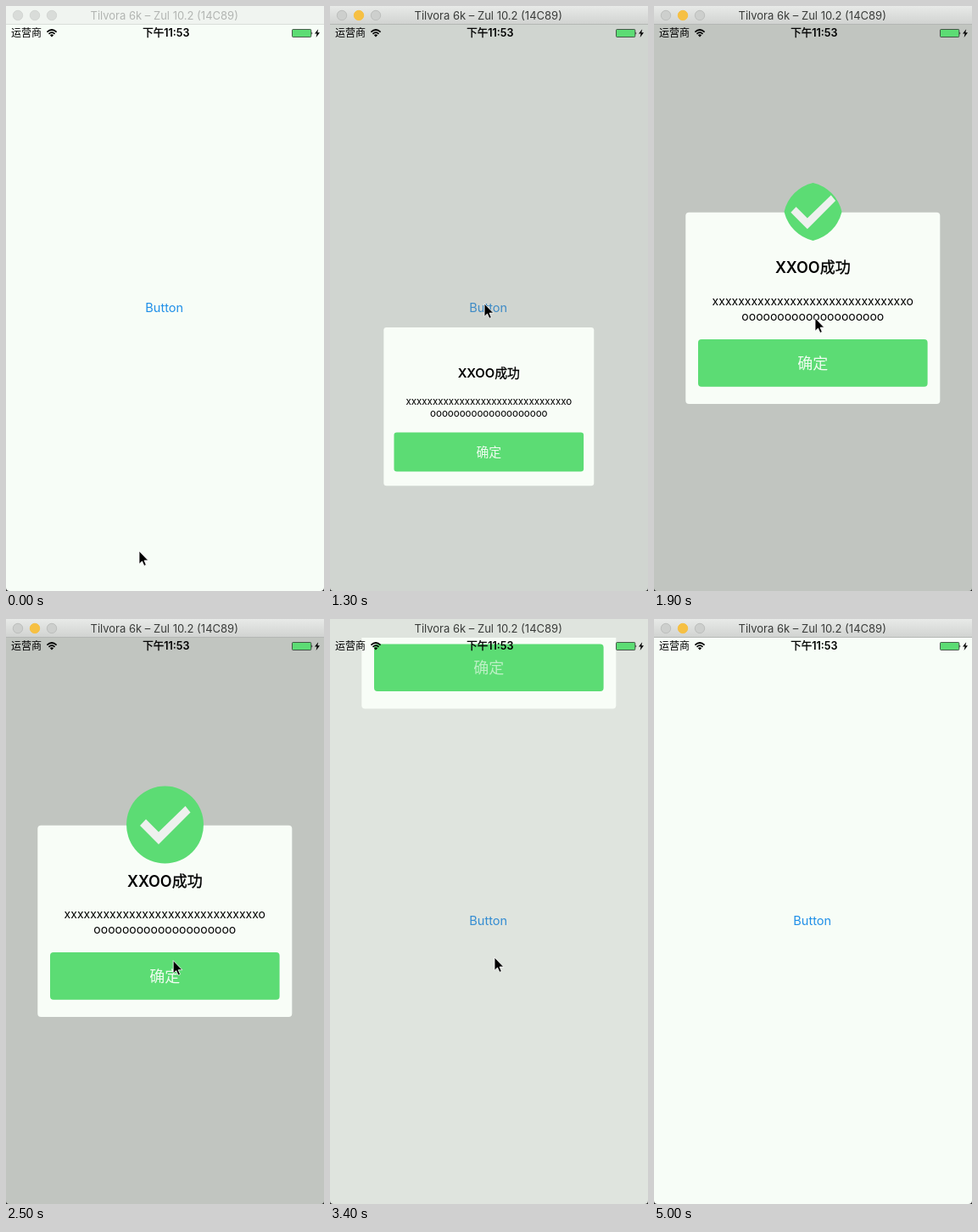
An HTML page that plays this animation: 375 by 688 pixels, repeating every 5500 ms.

```html
<!DOCTYPE html>
<html lang="zh">
<head>
<meta charset="utf-8">
<title>Popup dialog</title>
<style>
  html, body { margin: 0; width: 100%; height: 100%; overflow: hidden; background: #222; }
  svg { display: block; width: 100%; height: 100%; }
  text { font-family: Inter, "Noto Sans CJK SC", "Noto Sans CJK", sans-serif; text-anchor: middle; }
  .medium { font-weight: 500; stroke: #000; stroke-width: .35; }
</style>
</head>
<body>
<svg viewBox="0 0 375 688">
  <defs>
    <linearGradient id="active" x2="0" y2="1">
      <stop stop-color="#e8eae8"/><stop offset="1" stop-color="#d0d2d0"/>
    </linearGradient>
    <clipPath id="screen"><rect y="22" width="375" height="666"/></clipPath>
    <clipPath id="badgeClip"><path id="badgeEdge"/></clipPath>
    <clipPath id="window"><path d="M0 0H375V684Q375 688 371 688H4Q0 688 0 684Z"/></clipPath>
  </defs>

  <g clip-path="url(#window)">
    <rect width="375" height="688" fill="#f7fdf7"/>
    <text x="186.7" y="360" font-size="14.5" fill="#1f8fe8">Button</text>
    <rect id="dim" width="375" height="688" fill="#7f827d"/>

    <g clip-path="url(#screen)">
      <g id="panel">
        <rect x="37.3" y="242.7" width="300" height="225.3" rx="4" fill="#f8fdf7"/>
        <text x="187.3" y="314.5" font-size="18" font-weight="600">XXOO<tspan class="medium">成功</tspan></text>
        <text id="line1" x="187.3" y="352.3" font-size="14"></text>
        <text id="line2" x="187.3" y="369.8" font-size="14"></text>
        <rect x="52" y="392" width="270.6" height="55.7" rx="4" fill="#5cdc74"/>
        <text id="ok" x="187.3" y="426.8" font-size="18" fill="#f0fcf1">确定</text>
        <g id="badge" transform="translate(187.5 242)">
          <path id="disc" fill="#5cdc74"/>
          <g clip-path="url(#badgeClip)">
            <path id="check" d="M-29.5 1L-22.5 -6.5L-7.5 8.5L24 -22L30 -14.5L-7.5 23Z" fill="#eef1ee"/>
          </g>
        </g>
      </g>
    </g>

    <g id="bar">
      <rect id="barFill" width="375" height="22"/>
      <rect id="barLine" y="21" width="375" height="1"/>
      <g id="lights" stroke-width="1">
        <circle cx="14" cy="11" r="5.7"/>
        <circle cx="34" cy="11" r="5.7"/>
        <circle cx="54" cy="11" r="5.7"/>
      </g>
    </g>
    <text id="title" x="186.7" y="15.8" font-size="13">Tilvora 6k – Zul 10.2 (14C89)</text>

    <text x="24" y="36.3" font-size="12">运营商</text>
    <g fill="none" stroke="#000" stroke-width="1.7">
      <path d="M48.4 30.6Q54 25.4 59.6 30.6M50.5 32.8Q54 29.6 57.5 32.8"/>
      <path d="M54 36.4L51.9 34.2Q54 32.4 56.1 34.2Z" fill="#000" stroke="none"/>
    </g>
    <text x="188.8" y="36.3" font-size="12.5" font-weight="600"><tspan class="medium">下午</tspan>11:53</text>
    <rect x="337.5" y="27.5" width="22.3" height="9" rx="1" fill="#5cdc74" stroke="#222" stroke-width=".7"/>
    <path d="M360.5 30.3Q362.2 32 360.5 33.8Z"/>
    <path d="M368.2 27.2L364 32.6H366.6L365.6 36.9L370 31.3H367.3Z"/>

    <path id="cursor" d="M0 0V15.3L3.5 12L5.9 17.4L8.3 16.3L6 11.1H10.7Z" stroke="#fff" stroke-width=".8"/>
  </g>
</svg>

<script>
const $ = id => document.getElementById(id);
const set = (id, attrs) => {
  for (const key in attrs) $(id).setAttribute(key, attrs[key]);
};
const clamp = v => Math.min(1, Math.max(0, v));
const smooth = v => v * v * (3 - 2 * v);

const LOOP = 5500, STEP = 100;
const OPEN = 1190, POP = 1780, CLOSE = 3300;
const RADIUS = 45.5, TRAVEL = 667;

// time, x, y of the pointer tip
const pointer = [
  [0, 157, 641], [500, 181, 350], [700, 181, 350], [800, 182, 350],
  [1700, 182, 350], [1900, 190, 367], [2300, 198, 400], [2800, 196, 404],
  [3100, 194, 398], [3500, 194, 398], [4000, 192, 359], [4100, 192, 359],
  [4400, 84, 640], [4600, 84, 640], [5000, 88, 692], [LOOP, 88, 692]
];

$("line1").textContent = "x".repeat(30) + "o";
$("line2").textContent = "o".repeat(20);

function pointerAt(t) {
  const i = pointer.findIndex(k => k[0] > t);
  const [t0, x0, y0] = pointer[i - 1], [t1, x1, y1] = pointer[i];
  const p = (t - t0) / (t1 - t0);
  return [x0 + (x1 - x0) * p, y0 + (y1 - y0) * p];
}

// Distance left to rest for a damped spring
function spring(ms, decay, freq) {
  const s = Math.max(0, ms) / 1000;
  return Math.exp(-decay * s) * Math.cos(freq * s);
}

// Square of fixed corner radius: a pointed lens while it is small
function badgePath(scale) {
  const half = RADIUS * scale, r = Math.max(RADIUS, half), d = r - half;
  const a = Math.sqrt(r * r - d * d) - d;
  if (!(a > 0)) return "";
  const arc = (x, y) => `A${r} ${r} 0 0 1 ${x} ${y}`;
  return `M0 ${-a}` + arc(a, 0) + arc(0, a) + arc(-a, 0) + arc(0, -a) + "Z";
}

function drawBar(t) {
  const on = t >= 100;
  set("bar", { visibility: t >= 3400 && t < 3600 ? "hidden" : "visible" });
  set("barFill", { fill: on ? "url(#active)" : "#f0f4f0" });
  set("barLine", { fill: on ? "#b4b7b4" : "#d9ddd9" });
  set("title", { fill: on ? "#3a3c3a" : "#b2b5b2" });
  set("lights", { fill: on ? "#cdcfcd" : "#d9dcd9", stroke: on ? "#bdbfbd" : "#d3d6d3" });
  const mid = $("lights").children[1];
  mid.style.fill = mid.style.stroke = on ? "#f6c043" : "";
}

function drawPanel(t) {
  const left = spring(t - OPEN, 14, 5.7);
  const gone = smooth(clamp((t - CLOSE) / 189));
  const size = Math.max(0, 1 - left);
  const y = 355.4 + TRAVEL * (left - gone);
  const shade = 1 - Math.exp(-13 * Math.max(0, t - 1200) / 1000);
  set("dim", { opacity: 0.45 * shade * (1 - gone) });
  set("panel", {
    visibility: t >= 1200 && gone < 1 ? "visible" : "hidden",
    transform: `translate(187.3 ${y}) scale(${size}) translate(-187.3 -355.4)`
  });
  set("ok", { opacity: t < 3200 ? 1 : t < 3400 ? 0.18 : 0.65 });

  const scale = 1 - spring(t - POP, 9, 7);
  const edge = badgePath(scale);
  set("disc", { d: edge });
  set("badgeEdge", { d: edge });
  set("check", { transform: `scale(${0.5 + scale / 2})` });
}

function draw(ms) {
  const t = Math.floor((ms % LOOP) / STEP) * STEP;
  drawBar(t);
  drawPanel(t);
  set("cursor", { transform: `translate(${pointerAt(t)})` });
}

const start = performance.now();
function tick() {
  draw(performance.now() - start);
  requestAnimationFrame(tick);
}
tick();
</script>
</body>
</html>
```
